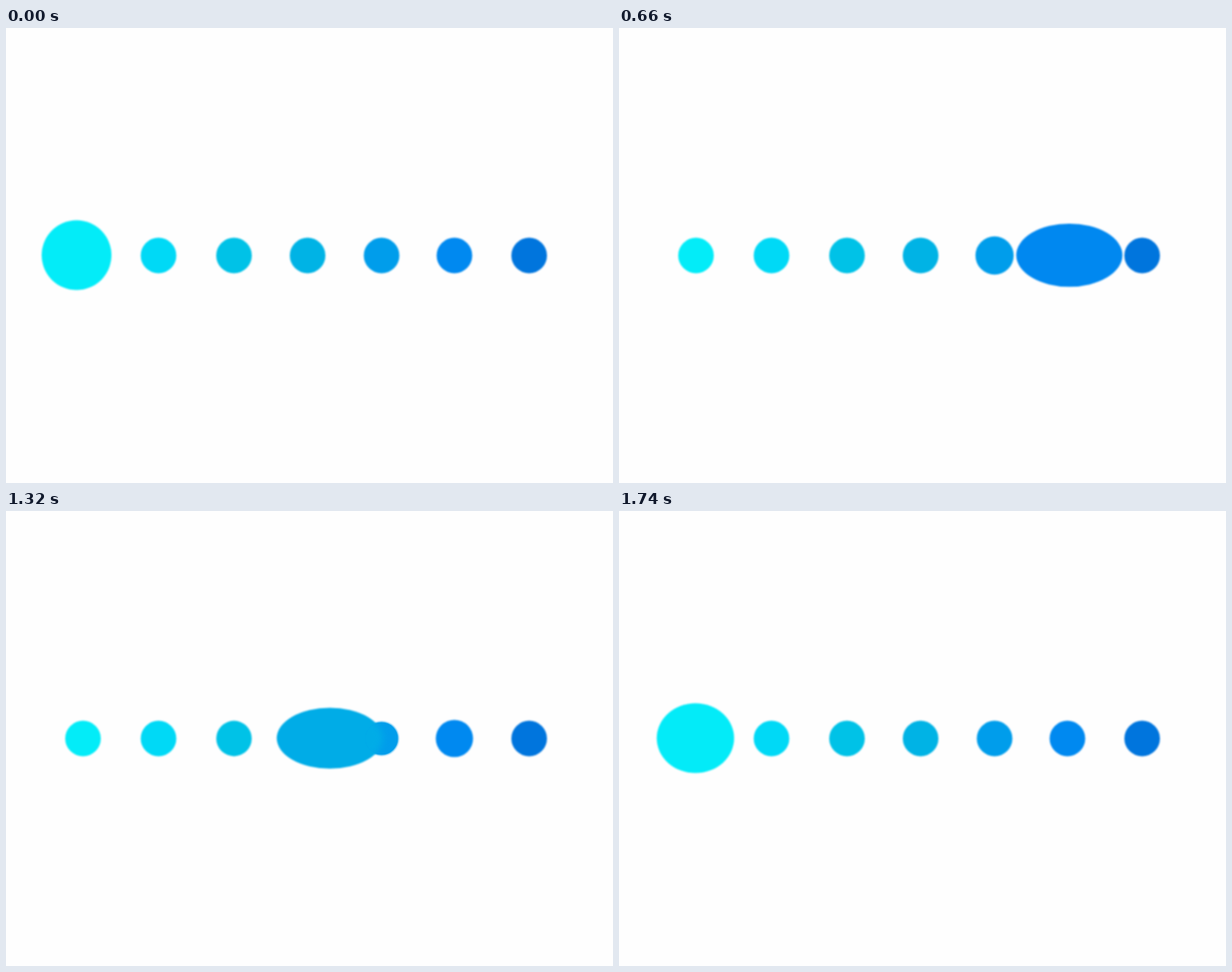
Animation of 800x600 px, one loop 1770 ms. Source, as an HTML page with a canvas:

```html
<!DOCTYPE html>
<html lang="en">
<head>
<meta charset="utf-8">
<title>Travelling blob</title>
<style>
  html, body { margin: 0; width: 100%; height: 100%; overflow: hidden; background: #fefefe; }
  canvas { display: block; }
</style>
</head>
<body>
<canvas id="stage" width="800" height="600"></canvas>
<script>
const ctx = document.getElementById('stage').getContext('2d');

const STEP = 30, STEPS = 59, PASS = 30;
const LEFT = 93, RIGHT = 700, DOT_R = 23.5, BLOB_R = 46;

const dots = [
  { x: 101.5, rgb: [3, 236, 248] },
  { x: 201, rgb: [0, 217, 246] },
  { x: 300.5, rgb: [0, 194, 231] },
  { x: 397.5, rgb: [0, 179, 229] },
  { x: 495, rgb: [0, 157, 235] },
  { x: 591, rgb: [0, 137, 240] },
  { x: 689.5, rgb: [0, 117, 221] }
];

// Stretch and squash of the blob over each pass, as [step, amount]
const stretch = [
  [[0, 0], [2, 5], [9, 22], [12, 23.7], [23, 24], [28, 5], [29, 1.5], [30, 0]],
  [[0, 0], [2, 3], [8, 16], [11, 23], [14, 24], [23, 24], [28, 5], [29, 1.5], [30, 0]]
];
const squash = [
  [[4, 0], [9, 4.3], [16, 6], [19, 7.5], [26, 0]],
  [[7, 0], [8, 0.4], [13, 5.5], [19, 7.5], [26, 0]]
];

const lerp = (a, b, k) => a + (b - a) * k;
const clamp = v => Math.max(0, Math.min(1, v));
const smooth = v => v * v * (3 - 2 * v);
const ramp = (v, a, b) => smooth(clamp((v - a) / (b - a)));
const css = rgb => `rgb(${rgb.map(Math.round).join(',')})`;

function track(points, t) {
  if (t <= points[0][0]) return points[0][1];
  for (let i = 1; i < points.length; i++) {
    const [t0, v0] = points[i - 1], [t1, v1] = points[i];
    if (t <= t1) return lerp(v0, v1, (t - t0) / (t1 - t0));
  }
  return points[points.length - 1][1];
}

function blobAt(pass, t) {
  const p = smooth(t / PASS);
  return {
    x: lerp(LEFT, RIGHT, pass ? 1 - p : p),
    rx: BLOB_R + track(stretch[pass], t),
    ry: BLOB_R - track(squash[pass], t)
  };
}

// Step at which the front (side 1) or back (side -1) of the blob reaches x
function crossing(pass, x, side) {
  const dir = pass ? -1 : 1;
  for (let t = 0; t <= PASS; t += 0.02) {
    const b = blobAt(pass, t);
    if (dir * (b.x - x) + side * b.rx >= 0) return t;
  }
  return Infinity;
}

for (const dot of dots) {
  dot.passes = [0, 1].map(pass => ({
    enter: crossing(pass, dot.x, 1),
    exit: crossing(pass, dot.x, -1)
  }));
}

function dotRadius(index, pass, t) {
  const last = dots.length - 1;
  const order = pass ? last - index : index;
  const { enter, exit } = dots[index].passes[pass];
  const dip = order === 0 || order === last ? 0 : 2;
  const pop = order === last - 1 ? 0 : 2;
  const after = t - exit;
  if (after < -0.7) return DOT_R - dip * ramp(t - enter, -2.2, 0.2);
  if (after < 1.7) return DOT_R + lerp(-dip, pop, ramp(after, -0.7, 1.5));
  return DOT_R + pop * (1 - ramp(after, 1.7, 5));
}

function blobColor(x) {
  const stops = dots.map(d => d.x);
  stops[0] = LEFT;
  let i = 0;
  while (i < stops.length - 2 && x > stops[i + 1]) i++;
  const k = clamp((x - stops[i]) / (stops[i + 1] - stops[i]));
  return css(dots[i].rgb.map((v, c) => lerp(v, dots[i + 1].rgb[c], k)));
}

function oval(x, y, rx, ry) {
  ctx.beginPath();
  ctx.ellipse(x, y, rx, ry, 0, 0, Math.PI * 2);
}

function fillOval(x, y, rx, ry, color, blur) {
  ctx.filter = `blur(${blur}px)`;
  ctx.fillStyle = color;
  oval(x, y, rx, ry);
  ctx.fill();
  ctx.filter = 'none';
}

function draw(step) {
  const pass = step < PASS ? 0 : 1;
  const t = step - pass * PASS;
  const blob = blobAt(pass, t);
  const color = blobColor(blob.x);
  const radii = dots.map((d, i) => dotRadius(i, pass, t));

  ctx.fillStyle = '#fefefe';
  ctx.fillRect(0, 0, 800, 600);
  dots.forEach((d, i) => fillOval(d.x, 300, radii[i], radii[i], css(d.rgb), 1));
  fillOval(blob.x, 299.6, blob.rx, blob.ry, color, 1);

  // Soft colour blend where the blob overlaps part of a dot
  dots.forEach((d, i) => {
    const r = radii[i] - 1;
    const gap = Math.abs(d.x - blob.x) - blob.rx;
    if (gap > r || gap < -r) return;
    ctx.save();
    oval(d.x, 300, r, r);
    ctx.clip();
    ctx.fillStyle = css(d.rgb);
    ctx.fillRect(d.x - r, 300 - r, 2 * r, 2 * r);
    fillOval(blob.x, 299.6, blob.rx, blob.ry, color, 4);
    ctx.restore();
  });
}

const start = performance.now();
function tick() {
  const ms = Math.max(0, performance.now() - start);
  draw(Math.floor(ms / STEP) % STEPS);
  requestAnimationFrame(tick);
}
tick();
</script>
</body>
</html>
```
